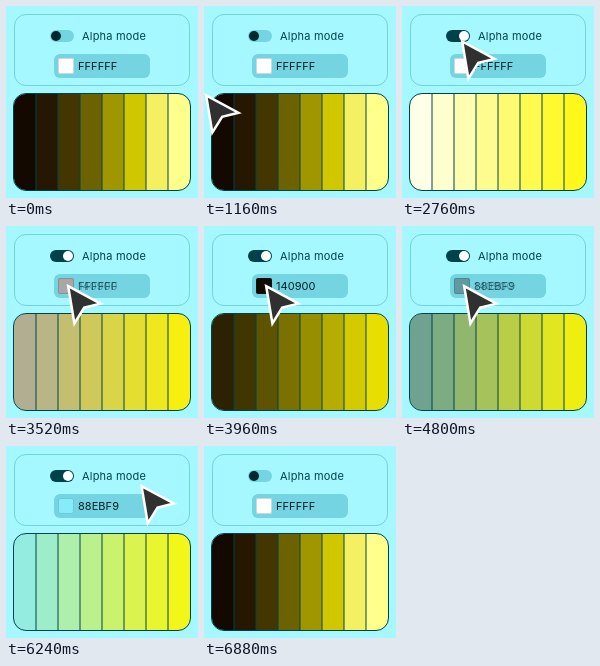
Animation, 192 px wide and 192 px high, one loop 6.96 s. Source, as an HTML page:

```html
<!DOCTYPE html>
<html lang="en">
<head>
<meta charset="utf-8">
<title>Alpha mode palette</title>
<style>
  html, body { margin: 0; width: 100%; height: 100%; overflow: hidden; background: #a5f8ff; }
  svg { display: block; width: 100vw; height: 100vh; }
  text { font: 11px Inter, Roboto, sans-serif; letter-spacing: .05px; }
  .label { letter-spacing: .2px; }
</style>
</head>
<body>
<svg viewBox="0 0 192 192">
  <defs>
    <clipPath id="round"><rect x="8" y="88" width="176" height="96" rx="12"/></clipPath>
  </defs>
  <rect width="192" height="192" fill="#a5f8ff"/>
  <rect x="8.5" y="8.5" width="175" height="71" rx="11.5" fill="none" stroke="#74d1df"/>
  <rect id="track" x="44" y="24" width="24" height="12" rx="6"/>
  <circle id="knob" cy="30" r="5"/>
  <text class="label" x="76" y="34" fill="#00424c">Alpha mode</text>
  <rect x="48" y="48" width="96" height="24" rx="6" fill="#74d4e1"/>
  <rect id="swatch" x="52" y="52" width="16" height="16" rx="2"/>
  <rect x="52.5" y="52.5" width="15" height="15" rx="1.5" fill="none" stroke="#00424c" stroke-opacity=".2"/>
  <text id="oldHex" x="72" y="64" fill="#00222a"></text>
  <text id="newHex" x="72" y="64" fill="#00222a"></text>
  <g id="cells" clip-path="url(#round)"></g>
  <path d="M30 88v96m22-96v96m22-96v96m22-96v96m22-96v96m22-96v96m22-96v96" stroke="#00424c"/>
  <rect x="7.5" y="87.5" width="177" height="97" rx="12.5" fill="none" stroke="#00424c"/>
  <path id="cursor" d="M2.2 2.2L34.5 19.6L18.2 23.6L8.4 39.4Z" fill="#303030" stroke="#fff" stroke-width="2.5"/>
</svg>
<script>
const LOOP = 6960, CLICK = 1600;
const $ = id => document.getElementById(id);
const clamp = (v, low = 0, high = 1) => Math.min(high, Math.max(low, v));
const lerp = (a, b, p) => a + (b - a) * p;
const easeOut = p => 1 - (1 - p) ** 3;
const easeInOut = p => p < .5 ? 2 * p * p : 1 - 2 * (1 - p) ** 2;
const rgb = hex => [0, 2, 4].map(i => parseInt(hex.slice(i, i + 2), 16));
const mix = (a, b, p) => a.map((v, i) => lerp(v, b[i], p));
const css = color => `rgb(${color.map(Math.round)})`;

// Each cell is red, green, blue, alpha, laid over the base colour.
const tones = ['140900', '261800', '443600', '6D6200', 'A09700', 'D0C700', 'F5EF62', 'FFFF8C']
  .map(hex => [...rgb(hex), 1]);
const yellows = tones.map((_, i) => [...rgb('FFF700'), clamp((i + .5) / 8, .1, .9)]);

const state = (hex, alpha) => ({
  hex,
  swatch: rgb(hex),
  cells: alpha ? yellows : tones,
  track: rgb(alpha ? '00424C' : '74D4E1'),
  knob: rgb(alpha ? 'FFFFFF' : '00262E'),
  knobX: alpha ? 62 : 50
});
const off = state('FFFFFF', false);
const states = [off, state('FFFFFF', true), state('140900', true), state('88EBF9', true), off];

const fades = [
  { start: 1592, length: 400 },
  { start: 3450, length: 510 },
  { start: 4685, length: 400 },
  { start: 6640, length: 240 }
];
const moves = [
  { start: 800, length: 800, from: [-40, 147], to: [58, 33], lift: 14 },
  { start: 2700, length: 760, from: [58, 33], to: [60, 58], lift: 0 },
  { start: 5840, length: 800, from: [60, 58], to: [206, 18], lift: 0 }
];

const cells = tones.map((_, i) => {
  const cell = document.createElementNS('http://www.w3.org/2000/svg', 'rect');
  const attrs = { x: 8 + 22 * i, y: 88, width: 22, height: 96 };
  for (const name in attrs) cell.setAttribute(name, attrs[name]);
  return $('cells').appendChild(cell);
});

function drawControls(t) {
  const index = Math.max(0, fades.findLastIndex(f => t >= f.start));
  const { start, length } = fades[index];
  const p = easeOut(clamp((t - start) / length));
  const a = states[index], b = states[index + 1];
  for (const id of ['track', 'knob', 'swatch']) $(id).setAttribute('fill', css(mix(a[id], b[id], p)));
  $('knob').setAttribute('cx', lerp(a.knobX, b.knobX, p));
  const base = mix(a.swatch, b.swatch, p);
  cells.forEach((cell, i) => {
    const [red, green, blue, alpha] = mix(a.cells[i], b.cells[i], p);
    cell.setAttribute('fill', css(mix(base, [red, green, blue], alpha)));
  });
  const same = a.hex === b.hex;
  $('oldHex').textContent = a.hex;
  $('newHex').textContent = b.hex;
  $('oldHex').setAttribute('opacity', same ? 1 : 1 - p);
  $('newHex').setAttribute('opacity', same ? 0 : p);
}

function drawCursor(t) {
  const move = moves.findLast(m => t >= m.start) || moves[0];
  const p = easeInOut(clamp((t - move.start) / move.length));
  const [x, y] = mix(move.from, move.to, p);
  const lift = move.lift * Math.sin(Math.PI * p);
  const press = .1 * clamp(1 - Math.abs(t - CLICK) / 200);
  $('cursor').setAttribute('transform', `translate(${x} ${y - lift}) scale(${1 - press})`);
}

const origin = performance.now();
function render() {
  const t = (performance.now() - origin) % LOOP;
  drawControls(t);
  drawCursor(t);
  requestAnimationFrame(render);
}
render();
</script>
</body>
</html>
```
